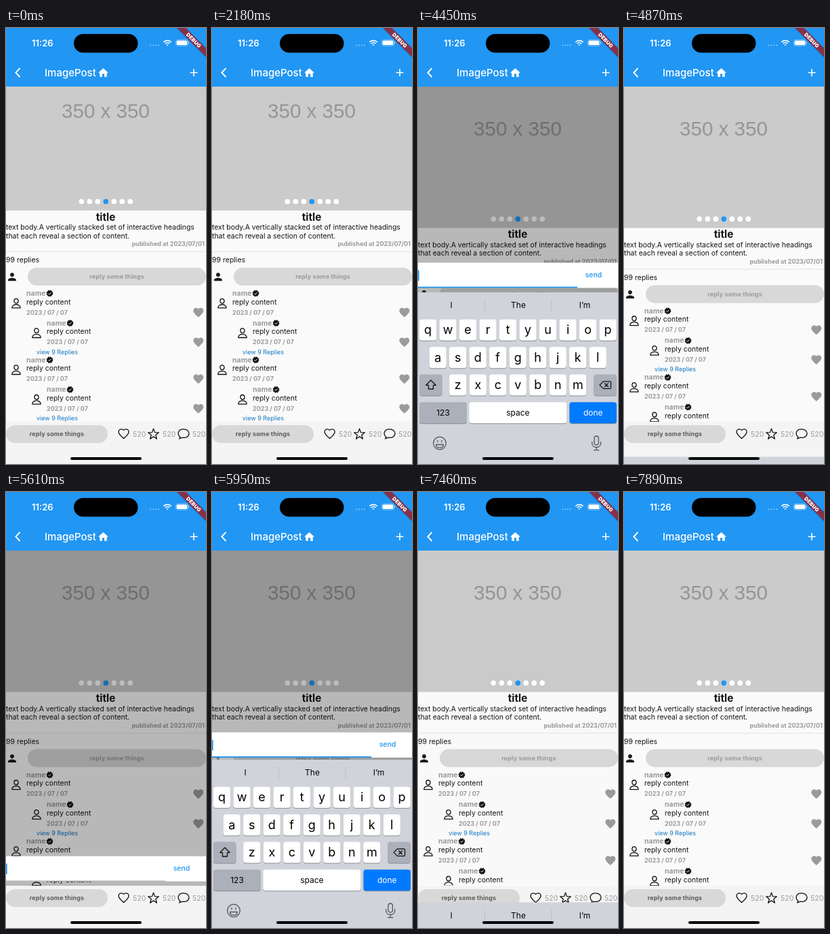
Recreate the animation shown at these times as an HTML page. Size 295 by 640 pixels, loop 8000 ms.

```html
<!DOCTYPE html>
<html lang="en">
<head>
<meta charset="utf-8">
<title>Reply sheet</title>
<style>
  html, body { margin: 0; width: 100%; height: 100%; overflow: hidden; background: #fafafa; }
  svg { display: block; width: 295px; height: 640px; }
  text { font-family: Inter, Roboto, sans-serif; font-size: 10.5px; fill: #151515; white-space: pre; }
  .mid { text-anchor: middle; }
  .end { text-anchor: end; }
  .bold { font-weight: 700; }
  .small { font-size: 9px; }
  .grey { fill: #9b9b9b; }
  .white { fill: #fff; }
  .link { fill: #1478c4; }
  .line { fill: none; stroke: #111; stroke-width: 1.3; stroke-linecap: round; stroke-linejoin: round; }
  .key { font-size: 18px; fill: #000; }
  .label { font-size: 12px; fill: #000; }
</style>
</head>
<body>
<svg viewBox="0 0 295 640" xmlns="http://www.w3.org/2000/svg">
  <defs>
    <clipPath id="bodyClip"><rect id="bodyArea" width="295" height="578"/></clipPath>
    <path id="heart" d="M12 21.35l-1.45-1.32C5.4 15.36 2 12.28 2 8.5 2 5.42 4.42 3 7.5 3c1.74 0 3.41.81 4.5 2.09C13.09 3.81 14.76 3 16.5 3 19.58 3 22 5.42 22 8.5c0 3.78-3.4 6.86-8.55 11.54z"/>
    <g id="badge">
      <circle r="4" fill="#111"/>
      <circle r="4" fill="none" stroke="#111" stroke-width="1.7" stroke-dasharray="1.9 1.24"/>
      <path d="M-2 .1L-.6 1.5 2.1-1.3" fill="none" stroke="#fff" stroke-width="1"/>
    </g>
    <g id="avatar" class="line">
      <ellipse cy="-3.6" rx="3.1" ry="3.4"/>
      <path d="M-6.2 6.6C-6.2 3.2-3.4 1.7 0 1.7s6.2 1.5 6.2 4.9z"/>
    </g>
  </defs>
  <rect width="295" height="640" fill="#fafafa"/>

  <g clip-path="url(#bodyClip)">
    <g id="page">
      <rect width="295" height="293.6" fill="#cbcbcb"/>
      <text class="mid" x="147" y="157.6" style="font:29.6px 'Liberation Sans',Arial,sans-serif;fill:#969696">350 x 350</text>
      <g id="dots"></g>
      <text class="mid bold" x="147" y="308.3" style="font-size:15.3px">title</text>
      <g letter-spacing="-.05">
        <text y="321.6">text body.A vertically stacked set of interactive headings</text>
        <text y="334.4">that each reveal a section of content.</text>
      </g>
      <text class="end bold small grey" x="293" y="345.8">published at 2023/07/01</text>
      <path d="M0 354H295" stroke="#e2e2e2"/>
      <text y="369.8">99 replies</text>
      <path transform="translate(0 382)scale(.75)" fill="#1c1c1c" d="M12 12c2.21 0 4-1.79 4-4s-1.79-4-4-4-4 1.79-4 4 1.79 4 4 4zm0 2c-2.67 0-8 1.34-8 4v2h16v-2c0-2.66-5.33-4-8-4z"/>
      <rect x="32" y="377.5" width="263" height="26.2" rx="13.1" fill="#d8d8d8"/>
      <text class="mid bold small grey" x="163.5" y="393.8" letter-spacing=".12">reply some things</text>
      <g id="replies"></g>
    </g>
    <rect id="scrim" width="295" height="640" opacity="0"/>
    <g id="sheet">
      <rect width="295" height="37" fill="#fff"/>
      <path d="M0 36.5H235" stroke="#8a8a8a" stroke-width=".8"/>
      <rect id="underline" y="35.2" height="1.8" fill="#2196f3"/>
      <rect id="cursor" y="11" width="1.6" height="15.5" fill="#2196f3"/>
      <text class="mid" x="259" y="21.6" style="fill:#2196f3;font-weight:500">send</text>
    </g>
  </g>

  <g id="bottomBar">
    <rect y="578" width="295" height="62" fill="#f4f4f4"/>
    <rect y="583" width="150" height="26.2" rx="13.1" fill="#d8d8d8"/>
    <text class="mid bold small" x="75" y="599.3" letter-spacing=".12" style="fill:#5c5c5c">reply some things</text>
    <use href="#heart" class="line" transform="translate(164.6 586.6)scale(.75)" style="stroke-width:1.8"/>
    <path id="star" class="line"/>
    <path class="line" d="M257 600.6C252 596.6 253.4 588.8 262 588.8c4.8 0 8 2.9 8 6.3 0 5-5.300 7-10 6.100L255.600 603z"/>
    <text class="grey" x="187" y="599.800">520</text>
    <text class="grey" x="231" y="599.800">520</text>
    <text class="grey" x="275" y="599.800">520</text>
  </g>

  <rect width="295" height="86" fill="#2196f3"/>
  <text class="white" x="38" y="26.500" style="font-size:13px;font-weight:600">11:26</text>
  <rect x="100" y="8.700" width="94.500" height="27.600" rx="13.800"/>
  <g fill="#fff" opacity=".45">
    <circle cx="213" cy="25.300" r="1.100"/><circle cx="217" cy="25.300" r="1.100"/>
    <circle cx="221" cy="25.300" r="1.100"/><circle cx="225" cy="25.300" r="1.100"/>
  </g>
  <g fill="none" stroke="#fff" stroke-width="1.700">
    <path d="M232.300 20.700a8 8 0 0 1 11.400 0M234.500 23a5 5 0 0 1 7 0"/>
    <path d="M236.600 24.700a2.200 2.200 0 0 1 2.800 0L238 26.200z" fill="#fff" stroke="none"/>
  </g>
  <rect x="250.500" y="17.300" width="18" height="9" rx="2.800" fill="none" stroke="#fff" stroke-width=".8" opacity=".5"/>
  <rect x="251.700" y="18.500" width="15.600" height="6.600" rx="1.700" fill="#fff"/>
  <path d="M269.600 20.300v3" stroke="#fff" opacity=".5"/>
  <path d="M20.500 59L14.400 65.500 20.500 72" fill="none" stroke="#fff" stroke-width="1.900"/>
  <text class="white" x="57" y="70.600" style="font-size:15px;font-weight:500">ImagePost</text>
  <path transform="translate(134.500 56.800)scale(.75)" fill="#fff" d="M10 20v-6h4v6h5v-8h3L12 3 2 12h3v8z"/>
  <path d="M271.500 65.500h11M277 60v11" stroke="#fff" stroke-width="1.600"/>

  <g id="keyboard">
    <rect y="388" width="295" height="252" fill="#d0d3da"/>
    <path d="M98.500 398v18M197 398v18" stroke="#b9bcc3" stroke-width=".8"/>
    <text class="mid label" x="49" y="411.400">I</text>
    <text class="mid label" x="148" y="411.400">The</text>
    <text class="mid label" x="246" y="411.400">I’m</text>
    <g id="keys"></g>
    <path class="line" d="M19 517l7.200 7.300h-3.700v5.700h-7v-5.700h-3.700z"/>
    <path class="line" d="M273.500 518.800h9.500q1.500 0 1.500 1.500v7.600q0 1.500-1.500 1.500h-9.500l-5.500-5.300zM275.600 521.700l4.800 4.800m0-4.800l-4.800 4.800"/>
    <g class="line" style="stroke:#54575c">
      <circle cx="32" cy="609.500" r="9.300"/>
      <path d="M26.500 611.500h11c-.5 6.200-10.500 6.200-11 0zM29 605.500v2M35 605.500v2"/>
      <rect x="260" y="599" width="6.400" height="13" rx="3.200"/>
      <path d="M256.700 607.500v2c0 8 13 8 13 0v-2M263.200 615.500v4M259.500 619.600h7.400"/>
    </g>
  </g>

  <rect x="95" y="630" width="105" height="4" rx="2"/>
  <g transform="translate(295 0)rotate(45)">
    <rect x="-31" y="20.500" width="62" height="10.500" fill="#000" opacity=".18"/>
    <rect x="-30" y="21" width="60" height="9" fill="#88304a"/>
    <text class="mid white" y="28.200" letter-spacing=".2" style="font-size:7.600px;font-weight:900">DEBUG</text>
  </g>
</svg>

<script>
const LOOP = 8000, KEYBOARD = 252, SHEET = 43.5, BAR_TOP = 578;
const $ = id => document.getElementById(id);
const clamp = v => Math.min(1, Math.max(0, v));
const ease = v => { v = clamp(v); return v * v * (3 - 2 * v); };
const spring = ms => { const x = Math.max(0, ms) * .01826; return 1 - (1 + x) * Math.exp(-x); };
const set = (id, attrs) => { for (const k in attrs) $(id).setAttribute(k, attrs[k]); };

function reply(x, y) {
  return `<use href="#avatar" x="${x - 15}" y="${y + 15}"/>
    <text class="bold grey" x="${x}" y="${y + 3.7}">name</text>
    <use href="#badge" x="${x + 34.5}" y="${y + .3}"/>
    <text x="${x}" y="${y + 16.4}">reply content</text>
    <text class="bold small grey" x="${x}" y="${y + 31.3}">2023 / 07 / 07</text>
    <use href="#heart" fill="#9b9b9b" transform="translate(274.8 ${y + 19.3})scale(.75)"/>`;
}

function key(x, y, w, label, cls = 'key', fill = '#fff', ink = '#000') {
  const base = y + (cls === 'key' ? 21.3 : 19.8);
  return `<rect x="${x}" y="${y + 1}" width="${w}" height="31" rx="3.8" fill="#898c92"/>
    <rect x="${x}" y="${y}" width="${w}" height="31" rx="3.8" fill="${fill}"/>
    <text class="mid ${cls}" x="${x + w / 2}" y="${base}" style="fill:${ink}">${label}</text>`;
}

const row = (letters, x, y) =>
  [...letters].map((c, i) => key(x + 29.5 * i, y, 25.2, c)).join('');

$('dots').innerHTML = Array.from({ length: 7 }, (_, i) =>
  `<circle cx="${111.3 + 12 * i}" cy="280.4" r="3.8" fill="${i === 3 ? '#2196f3' : '#fff'}"/>`).join('');

$('replies').innerHTML = [415, 512.6].map(y => reply(30, y) + reply(60, y + 43.6) +
  `<text class="small link" x="45" y="${y + 89.3}">view 9 Replies</text>`).join('');

$('keys').innerHTML = row('qwertyuiop', 2, 427.8) + row('asdfghjkl', 16.6, 468.2) +
  row('zxcvbnm', 46.2, 508.6) +
  key(2, 508.6, 33.5, '', 'label', '#abb0ba') + key(259.3, 508.6, 33.5, '', 'label', '#abb0ba') +
  key(2, 549.2, 70, '123', 'label', '#abb0ba') + key(75.3, 549.2, 144.2, 'space', 'label') +
  key(223.5, 549.2, 69.5, 'done', 'label', '#007aff', '#fff');

$('star').setAttribute('d', 'M' + Array.from({ length: 10 }, (_, i) => {
  const r = i % 2 ? 3.4 : 8.3, a = Math.PI * (i / 5 - .5);
  return `${217.5 + r * Math.cos(a)} ${596.4 + r * Math.sin(a)}`;
}).join('L') + 'z');

const bursts = [[3250, 4010, 7], [4240, 5090, 8], [5500, 6270, 7], [6380, 6810, 4], [7020, 7890, 8]];
const visits = [
  { open: 3145, kb: 3301, close: 4500 },
  { open: 5460, kb: 5620, close: 7270 }
];

function snap(t) {
  const burst = bursts.filter(b => b[0] <= t).pop();
  if (!burst) return 0;
  const [start, end, n] = burst, step = (end - start) / n;
  return start + Math.min(n, Math.floor((t - start) / step)) * step;
}

function draw(t) {
  const v = t < visits[1].open ? visits[0] : visits[1];
  const rise = at => spring(at - v.kb) * (1 - spring(at - v.close));
  const shown = ease((t - v.open) / 140) * (1 - ease((t - v.close) / 200));
  // The layout follows the keyboard two screen refreshes late.
  const bottom = Math.min(BAR_TOP, 640 - KEYBOARD * rise(t - 33));
  const focus = 235 * ease((t - v.kb) / 167);

  set('page', { transform: `translate(0 ${t < visits[0].open ? -25.7 : 0})` });
  set('bodyArea', { height: bottom });
  set('scrim', { opacity: .265 * shown });
  set('sheet', {
    transform: `translate(0 ${bottom - SHEET * shown})`,
    visibility: shown > 0 ? 'visible' : 'hidden'
  });
  set('underline', { x: (235 - focus) / 2, width: focus });
  set('cursor', { opacity: 1 - clamp((t - 6380) / 430) });
  set('keyboard', { transform: `translate(0 ${KEYBOARD * (1 - rise(t))})` });
}

const began = performance.now();
(function tick() {
  draw(snap((performance.now() - began) % LOOP));
  requestAnimationFrame(tick);
})();
</script>
</body>
</html>
```
